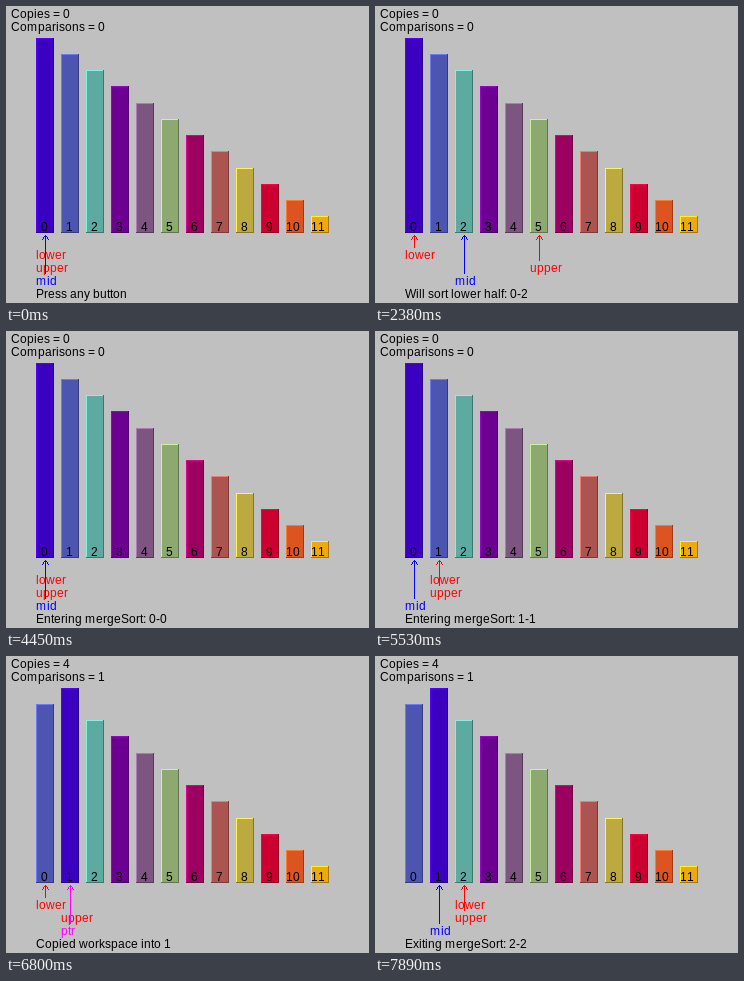
Animation of 363x297 px, one loop 8 s. Source, as an HTML page with a canvas:

```html
<!DOCTYPE html>
<html lang="en">
<head>
<meta charset="utf-8">
<title>Merge sort</title>
<style>
  html, body { margin: 0; width: 100%; height: 100%; overflow: hidden; background: #c0c0c0; }
  canvas { display: block; }
</style>
</head>
<body>
<canvas id="stage" width="363" height="297"></canvas>
<script>
const g = document.getElementById('stage').getContext('2d');
const LOOP = 8000, COUNT = 12, LEFT = 30, STEP = 25, BAR_W = 18, BOTTOM = 227;

// start time, note, lower, upper, mid
const steps = [
  [0, 'Press any button', 0, 0, 0],
  [250, 'Initial call to mergeSort', 0, 0, 0],
  [750, 'Entering mergeSort: 0-11', 0, 11, 0],
  [1400, 'Will sort lower half: 0-5', 0, 11, 5],
  [1810, 'Entering mergeSort: 0-5', 0, 5, 5],
  [2380, 'Will sort lower half: 0-2', 0, 5, 2],
  [2780, 'Entering mergeSort: 0-2', 0, 2, 2],
  [3340, 'Will sort lower half: 0-1', 0, 2, 1],
  [3770, 'Entering mergeSort: 0-1', 0, 1, 1],
  [4050, 'Will sort lower half: 0-0', 0, 1, 0],
  [4450, 'Entering mergeSort: 0-0', 0, 0, 0],
  [4850, 'Exiting mergeSort: 0-0', 0, 0, 0],
  [5380, 'Will sort upper half: 1-1', 0, 1, 0],
  [5530, 'Entering mergeSort: 1-1', 1, 1, 0],
  [5680, 'Exiting mergeSort: 1-1', 1, 1, 0],
  [5960, 'Will merge ranges', 0, 1, 0],
  [6240, 'Merged 0-0 and 1-1 into workspace', 0, 1, 0],
  [6520, 'Copied workspace into 0', 0, 1, 0],
  [6800, 'Copied workspace into 1', 0, 1, 1],
  [7080, 'Exiting mergeSort: 0-1', 0, 1, 1],
  [7340, 'Will sort upper half: 2-2', 0, 2, 1],
  [7770, 'Entering mergeSort: 2-2', 2, 2, 1],
  [7890, 'Exiting mergeSort: 2-2', 2, 2, 1]
];

const barX = i => LEFT + STEP * i;
const rgb = c => `rgb(${c.map(v => Math.min(255, Math.floor(v)))})`;

function rect(x, y, w, h, color) {
  g.fillStyle = color;
  g.fillRect(x, y, w, h);
}

// Text on whole-pixel advances, as on an old bitmap display
function text(str, x, y, color = '#000') {
  g.fillStyle = color;
  for (const ch of str) {
    g.fillText(ch, x, y);
    x += ch === 'm' ? 11 : Math.round(g.measureText(ch).width);
  }
}

function bar(slot, item) {
  const x = barX(slot), y = Math.floor(32 + 16.25 * item), h = BOTTOM - y;
  const base = [60 + 16 * item, 85 * (item % 3), 192 - 16 * item];
  rect(x, y, BAR_W, h, rgb(base.map(v => v * 0.7)));
  rect(x, y, BAR_W - 1, h - 1, rgb(base.map(v => v / 0.7)));
  rect(x + 1, y + 1, BAR_W - 2, h - 2, rgb(base));
  text(String(slot), x + (slot < 10 ? 5 : 0), 225);
}

function pointer(label, slot, row, color) {
  const tip = barX(slot) + 9, top = 229, base = 253 + 13 * row;
  rect(tip, top, 1, base - 11 - top, color);
  [1, 2, 2, 3].forEach((dx, i) => {
    rect(tip - dx, top + 1 + i, 1, 1, color);
    rect(tip + dx, top + 1 + i, 1, 1, color);
  });
  text(label, barX(slot), base, color);
}

function draw(t) {
  const [, note, lower, upper, mid] = steps.findLast(s => s[0] <= t);
  const copies = t < 6240 ? 0 : t < 6520 ? 2 : t < 6800 ? 3 : 4;
  const items = Array.from({ length: COUNT }, (_, i) => i);
  if (copies >= 3) items[0] = 1;
  if (copies >= 4) items[1] = 0;

  rect(0, 0, 363, 297, '#c0c0c0');
  g.font = '12px Arial, "Liberation Sans", sans-serif';
  text('Copies = ' + copies, 5, 12);
  text('Comparisons = ' + (copies ? 1 : 0), 5, 25);
  items.forEach((item, slot) => bar(slot, item));
  pointer('lower', lower, 0, '#f00');
  pointer('upper', upper, 1, '#f00');
  if (t >= 6240 && t < 7340) pointer('ptr', mid, 2, '#f0f');
  else pointer('mid', mid, 2, '#00f');
  text(note, LEFT, 292);
}

const start = performance.now();
function tick() {
  draw((performance.now() - start) % LOOP);
  requestAnimationFrame(tick);
}
tick();
</script>
</body>
</html>
```
